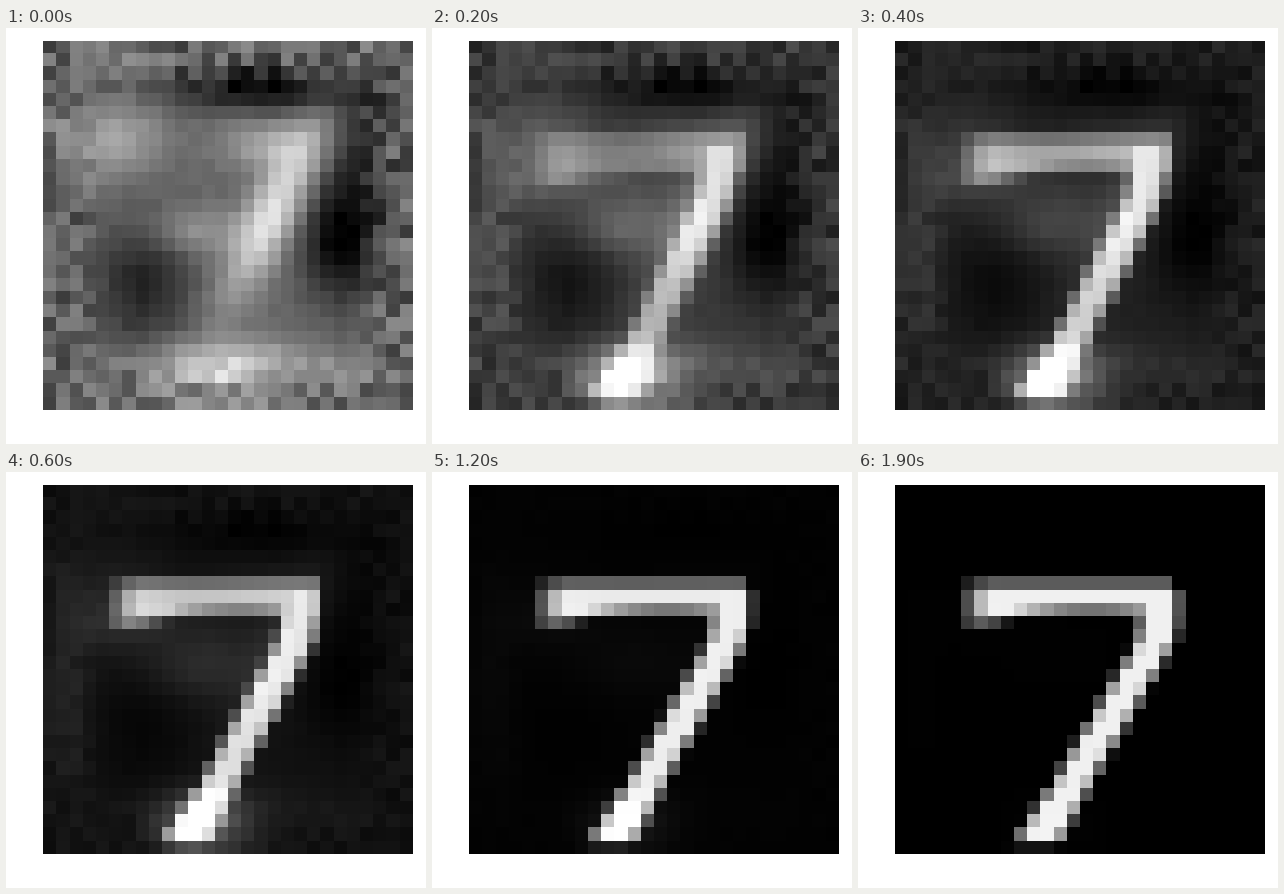
Recreate the animation shown at these times as an HTML page with a canvas. Size 420 by 416 pixels, loop 2000 ms.

```html
<!DOCTYPE html>
<html lang="en">
<head>
<meta charset="utf-8">
<title>Digit emerging from noise</title>
<style>
html, body { margin: 0; width: 100%; height: 100%; overflow: hidden; background: #fff; }
canvas { display: block; }
</style>
</head>
<body>
<canvas id="stage" width="420" height="416"></canvas>
<script>
const ctx = document.getElementById("stage").getContext("2d");
const N = 28, LOOP = 2000, STEP = 100, BASE = 0.4;

const clamp = (v, lo = 0, hi = 1) => Math.min(hi, Math.max(lo, v));
const bell = (d, spread) => Math.exp(-((d / spread) ** 2) / 2);
const spot = (x, y, cx, cy, sx, sy) => bell(x - cx, sx) * bell(y - cy, sy);

// The blurred first guess: light patches, a broad stem and dark hollows.
function firstGuess(x, y) {
  const stem = bell(x - 19 + 0.45 * (y - 9.5), 1.5) * bell(y - 13, 4.5);
  const light = 0.5 * stem
    + 0.24 * spot(x, y, 5.5, 7.5, 2.5, 2.2)
    + 0.25 * spot(x, y, 17, 8, 2.5, 1.2)
    + 0.2 * spot(x, y, 11.5, 14.3, 2.5, 1.2)
    + 0.42 * spot(x, y, 14, 24.8, 4.8, 1.4);
  const dark = 0.38 * spot(x, y, 17, 3.7, 5.5, 1.1)
    + 0.2 * spot(x, y, 24, 8, 1.5, 3)
    + 0.42 * spot(x, y, 22.6, 15, 2, 3.3)
    + 0.26 * spot(x, y, 7.5, 18.5, 2.5, 3.6);
  return clamp(BASE + light - dark);
}

// Glow that swells and goes while the digit forms.
function glow(x, y) {
  return 0.45 * spot(x, y, 12, 25.8, 2.2, 1.5)
    + 0.15 * spot(x, y, 6, 10.3, 2.5, 1.5)
    + 0.12 * spot(x, y, 12.5, 13, 3.5, 2.2)
    + 0.1 * spot(x, y, 1.8, 15, 1.3, 6);
}

// A slightly bowed bar, thicker at its left end.
function bar(x, y, fade) {
  if (x > 21) return 0;
  const bow = 0.007 * (x - 15) ** 2;
  const half = 1.45 + bow + 0.8 * fade;
  const body = clamp((half - Math.abs(y - 8.55 - bow)) / 1.05);
  return body * clamp((x - 4.8) / 2.2) * (1 - 0.8 * fade);
}

// The stem drops upright, then slants; its upper part drifts right with time.
function stem(x, y, k) {
  if (y < 8) return 0;
  const drift = 1.6 * Math.exp(-k / 7) * clamp((24 - y) / 12);
  const slant = Math.log(1 + Math.exp(2 * (y - 11.5))) / 2;
  const half = 1.9 + 0.05 * Math.max(0, y - 22);
  const body = clamp((half - Math.abs(x - 20.1 + 0.6 * slant + drift)) / 1.15);
  return y > N - 1 ? body * 0.07 : body;
}

// Seeded grain, strong along the border and faint in the middle.
function grain(c, r) {
  const h = Math.sin(c * 127.1 + r * 311.7) * 43758.5453;
  const edge = Math.max(Math.abs(c - 13.5), Math.abs(r - 13.5)) / 14;
  return (h - Math.floor(h) - 0.5) * 0.34 * clamp((edge - 0.65) / 0.2, 0.12, 1);
}

const edgeX = c => Math.round(37.2 + c * 13.2);
const edgeY = r => Math.max(13, Math.round(12.02 + r * 13.21));

function draw(k) {
  const fade = Math.exp(-k / 4.2) * (1 - k / 19);
  const swell = k / 3 * Math.exp(1 - k / 3);
  ctx.fillStyle = "#fff";
  ctx.fillRect(0, 0, 420, 416);
  for (let r = 0; r < N; r++) {
    for (let c = 0; c < N; c++) {
      const x = c + 0.5, y = r + 0.5;
      const digit = 0.94 * Math.max(bar(x, y, fade), stem(x, y, k));
      const v = digit * (1 - fade) + (firstGuess(x, y) + grain(c, r)) * fade
        + glow(x, y) * swell;
      const g = Math.round(255 * clamp(v));
      ctx.fillStyle = `rgb(${g},${g},${g})`;
      const left = edgeX(c), top = edgeY(r);
      ctx.fillRect(left, top, edgeX(c + 1) - left, edgeY(r + 1) - top);
    }
  }
}

let shown = -1;
function tick() {
  let k = Math.floor(performance.now() % LOOP / STEP);
  if (k === 15) k = 14; // the picture rests for one step
  if (k !== shown) draw(shown = k);
  requestAnimationFrame(tick);
}
tick();
</script>
</body>
</html>
```
